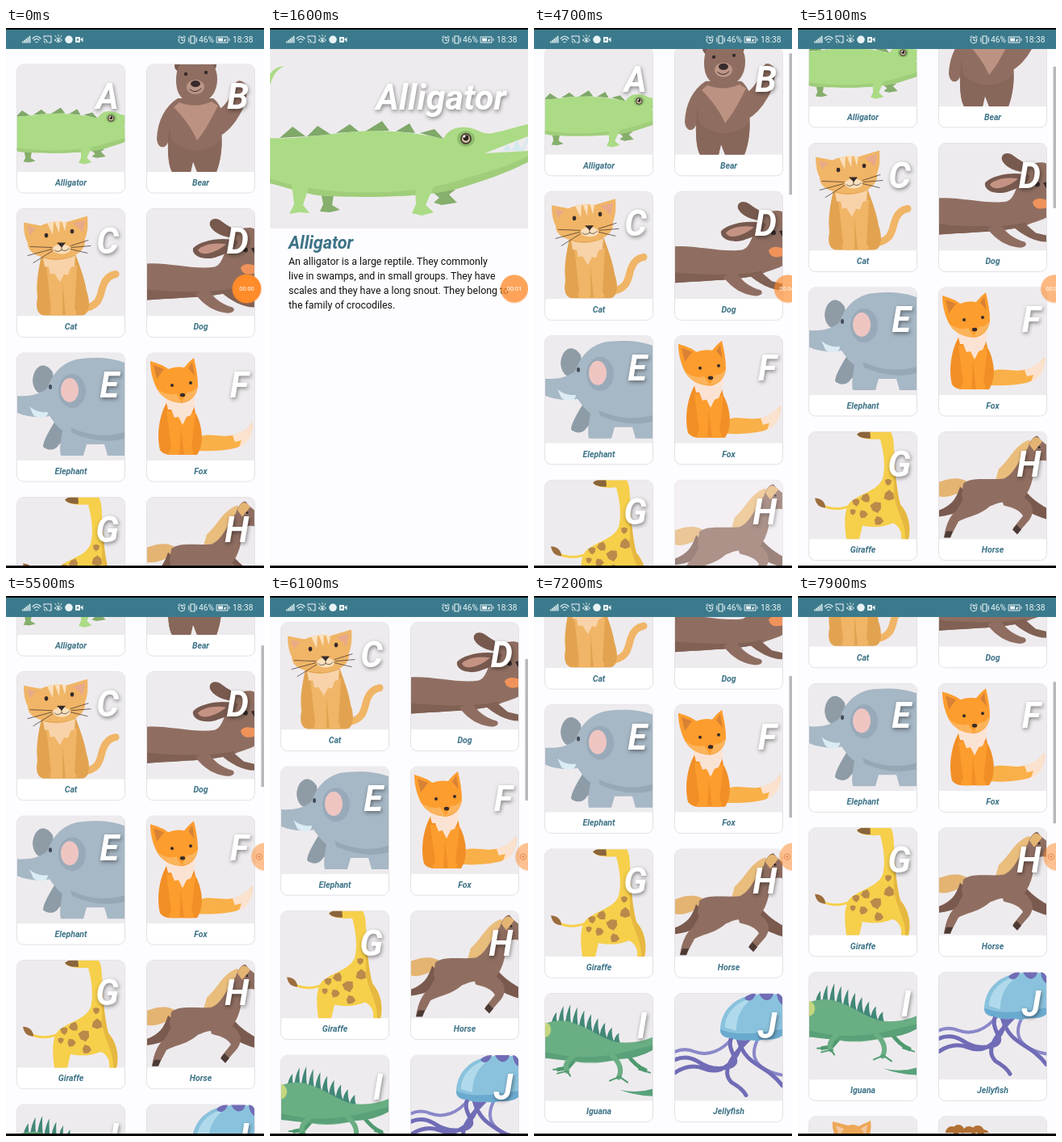
These frames come from a looping animation (320 by 668 pixels, 8000 ms). An HTML page with a canvas:

```html
<!DOCTYPE html>
<html lang="en">
<head>
<meta charset="utf-8">
<title>Animal alphabet</title>
<style>
html, body { margin: 0; width: 100%; height: 100%; overflow: hidden; background: #fdfcff; }
canvas { display: block; width: 320px; height: 668px; }
</style>
</head>
<body>
<canvas id="stage" width="320" height="668"></canvas>
<script>
const ctx = document.getElementById('stage').getContext('2d');
const LOOP = 8000, TEAL = '#3c7287', PANEL = '#eeebee', PAGE = '#fdfcff', DARK = '#372b2b';

// Path helpers
const oval = (x, y, rx, ry = rx) => `M${x - rx} ${y}a${rx} ${ry} 0 1 0 ${2 * rx} 0a${rx} ${ry} 0 1 0 ${-2 * rx} 0Z`;
const patch = (x, y, r) => 'M' + [0, 1, 2, 3, 4, 5].map(i => {
  const a = i * Math.PI / 3 + x, k = r * (i % 2 ? 0.85 : 1.05);
  return `${(x + k * Math.cos(a)).toFixed(1)} ${(y + k * Math.sin(a)).toFixed(1)}`;
}).join('L') + 'Z';

// Each layer is [colour, path, stroke width]; without a width it is filled.
const BROWN = '#8f6e61', GREY = '#a6b7c5', ORANGE = '#fc9d2e', YELLOW = '#f6cf4b', GREEN = '#6aae83', VIOLET = '#706cb6', CAT = '#f0b566';

// Drawn for the 320 x 222 banner
const alligator = [
  ['#7fa869', 'M12 110L28 96 44 108ZM46 108L59 95 76 106ZM82 104L99 93 110 102ZM118 102L139 89 148 101ZM156 102L173 92 180 104ZM186 104L204 99 216 112Z'],
  ['#86ae6c', 'M62 172L66 192 62 201 74 202 87 199 77 193 80 174ZM196 172L210 184 203 190 213 193 232 190 222 180 230 174Z'],
  ['#abdb85', 'M18 21Q5 26 0 45V31Q7 21 18 21Z'],
  ['#abdb85', 'M0 110C30 112 60 106 90 104C130 98 180 103 215 111C221 100 231 96 243 97C257 97 262 107 276 104C292 101 306 96 320 93V108L266 129 320 126V139C292 153 262 162 235 172C190 185 100 184 60 181C40 178 20 171 0 166Z'],
  ['#9fcd7a', 'M0 160C60 182 170 184 236 162C270 152 300 144 320 132V140C290 155 262 164 235 172C190 185 100 184 60 181C40 178 20 171 0 166Z'],
  ['#abdb85', 'M26 160L30 192 24 204 36 202 49 203 41 193 50 165ZM180 165L181 192 176 203 188 206 203 202 193 193 204 168Z'],
  ['#d5e8ef', 'M282 122L288 128 294 117 300 126 306 112 312 124 320 108V114L314 126H286Z'],
  ['#8ebd6d', oval(243, 111, 11, 10)],
  ['#4b4038', oval(243, 111, 7)], ['#d9c9a5', oval(243, 111, 5)], ['#292424', oval(243, 110, 3.4)],
  ['#fff', oval(241, 108, 1.5)]
];

// The rest are drawn for a 133 x 133 tile
const bear = [
  ['#7a5c51', oval(41, 2, 7) + oval(79, 1, 7)],
  [BROWN, 'M82 60Q100 52 107 30Q111 14 122 24Q127 42 115 62Q104 82 88 90Z'],
  [BROWN, 'M38 42C22 52 13 70 12 92C13 105 23 105 26 96C26 110 26 125 31 133H54L57 120 62 133H86C92 118 94 98 92 80C98 66 92 50 82 42Z'],
  ['#87675a', 'M28 74C24 98 26 124 31 133H54L57 120 62 133H86C91 120 93 104 92 92C80 110 44 112 30 92Z'],
  [BROWN, 'M36 20C36 0 44-8 61-8C78-8 87 2 87 18C87 36 76 48 61 48C45 48 36 38 36 20Z'],
  ['#bc9282', 'M33 53L40 47Q60 55 80 46L88 51C82 62 74 80 62 94C56 80 46 66 33 53Z'],
  ['#bc9686', oval(60, 28, 11, 9)],
  [DARK, oval(60, 24, 6, 4) + oval(48, 12, 2.2) + oval(73, 10, 2.2)],
  [DARK, 'M53 31Q60 37 67 30', 1]
];
const cat = [
  [CAT, 'M78 124C106 122 102 104 107 94C110 86 116 82 122 81', 9],
  ['#e2a350', 'M30 58C26 76 23 92 25 110C22 124 26 132 34 132H80C90 132 91 116 86 102C84 88 78 72 72 56Z'],
  [CAT, 'M36 70L42 124Q38 132 46 132H56V92L60 132H70Q76 130 71 124L74 70Z'],
  [CAT, 'M8 17C8 30 10 38 14 44L34 22ZM60 17L87 9C88 22 87 32 83 40Z'],
  ['#e8a98a', 'M12 22L17 36 27 25ZM69 18L84 14 81 30Z'],
  [CAT, 'M13 44C14 28 27 18 48 16C68 15 82 24 84 39C85 53 70 61 52 62C31 62 14 57 13 44Z'],
  ['#fae0bd', 'M37 18L44 32 45 16ZM46 15L52 30 53 15ZM55 15L59 28 61 17Z' + oval(55, 50, 11, 6)],
  ['#f8d3a9', 'M32 61L34 72 39 72 41 81 46 80 53 91 58 81 63 82 66 73 71 71 72 58Q52 67 32 61Z'],
  [DARK, oval(36, 33, 2.3, 2.8) + oval(68, 28, 2.3, 2.8) + 'M49 42H60L55 48Z'],
  [DARK, 'M55 47V51Q49 55 46 51M55 51Q61 54 64 49M43 48L16 47M43 50L13 58M44 52L20 67M66 46L88 39M67 48L91 46M66 50L87 55', .7]
];
const dog = [
  ['#77594e', 'M110 36C96 36 82 30 78 21C76 12 86 10 93 16C101 23 110 24 114 32Z'],
  ['#806154', 'M100 94L120 111 133 114V122C118 122 104 114 90 102Z'],
  [BROWN, 'M0 68C24 66 60 76 84 72C95 68 96 50 104 36C110 26 124 21 133 25V92C124 97 114 98 108 102C80 110 40 110 0 113Z'],
  ['#806154', 'M0 100C40 104 82 104 108 98V102C80 110 40 110 0 113Z'],
  [BROWN, 'M74 98C84 112 92 118 106 122C111 126 105 130 98 129C84 127 72 121 60 106Z'],
  ['#77594e', 'M113 40C94 34 66 39 57 49C55 60 74 65 88 59C100 55 111 50 113 40Z'],
  ['#c59384', 'M98 44C84 41 68 45 63 51C66 59 82 57 98 44Z'],
  [DARK, oval(122, 51, 3, 3) + 'M129 49L133 48V56Z'],
  ['#f0935b', 'M116 73C121 66 128 69 133 70V80C126 82 118 82 116 73Z']
];
const elephant = [
  ['#8f9ca6', 'M44 24C34 8 20 16 19 34C20 46 26 52 34 50L46 40Z'],
  ['#8d9ca7', 'M48 82C40 96 32 108 32 116C39 122 48 120 51 114L70 96Z'],
  [GREY, 'M133 12C118 6 98 5 80 7C58 9 44 24 38 42C30 52 12 54 0 53V74C14 80 30 80 40 78C46 86 50 92 56 96C54 108 52 118 54 127H82L86 113H108L112 127H133Z'],
  ['#96a8b6', 'M66 92Q100 108 133 98V106Q104 114 68 99Z'],
  ['#98aab9', oval(68, 47, 17, 21)], ['#efc5c2', oval(65, 46, 11, 15)],
  ['#454e57', oval(41, 42, 2, 3)],
  ['#dcecf4', 'M15 66C22 72 30 74 38 73C38 82 26 82 20 77Z']
];
const fox = [
  ['#f9b048', 'M58 108C74 94 92 108 112 100C120 97 126 92 130 86C133 100 124 114 108 118C90 122 70 122 56 120Z'],
  ['#fbe2cf', 'M106 102C120 97 126 92 130 86C133 100 124 114 114 117L117 108 109 110Z'],
  ['#f18f26', 'M26 58C14 78 12 102 16 120Q20 126 30 126H62C72 112 68 88 60 74L56 56Z'],
  [ORANGE, 'M24 72L30 118Q24 126 30 126H40L42 92 46 126H56Q60 124 55 118L60 74Z'],
  ['#fbe3d4', 'M22 54L26 70 30 70 34 80 39 79 44 89 49 79 54 77 58 68 60 54Z'],
  [ORANGE, 'M4 10C14 13 22 16 26 20Q36 16 46 18C50 13 54 9 58 6C61 18 63 30 63 41C62 53 53 61 43 62C28 61 17 54 12 44C6 32 4 20 4 10Z'],
  ['#d98134', 'M8 15L21 20 12 32ZM56 11L51 19 59 28Z'],
  ['#fbb45b', 'M13 45Q26 54 36 50L43 61Q22 61 13 45ZM63 41Q56 50 50 48L43 61Q60 58 63 41Z'],
  [DARK, oval(31, 40, 2) + oval(54, 37, 2) + oval(44, 52, 3.2, 2.3)]
];
const giraffe = [
  [YELLOW, 'M52 91C38 97 24 96 15 90', 3],
  ['#9b6d3e', 'M7 82C15 82 20 87 20 94C12 94 8 89 7 82Z'],
  [YELLOW, 'M59 3C66-2 80-6 92-6C104-4 105 10 105 24C105 50 108 74 113 90C122 100 127 116 123 133H114C115 124 112 117 104 113C92 118 78 119 66 116L62 133H46C44 118 42 98 50 88C62 76 84 74 91 58C95 42 92 24 88 9C76 10 62 9 59 3Z'],
  ['#e6b840', 'M105 20C106 50 109 74 113 90C122 100 127 116 123 133H119C120 112 107 98 105 76Z'],
  ['#b98a4a', [[58, 87, 5], [70, 82, 6], [83, 93, 7.5], [99, 79, 7], [67, 102, 5.5], [86, 110, 6], [98, 62, 4.5], [54, 99, 4]].map(p => patch(...p)).join('')],
  ['#8a643b', 'M59 3Q66-2 75-3L76 8Q63 9 59 3Z']
];
const horse = [
  ['#e4b473', 'M38 64C26 54 12 58 0 62V80C14 83 26 74 38 68Z'],
  ['#e9bd7c', 'M112 10C94 16 88 34 74 46L70 60 104 54 118 22Z'],
  ['#7a5a4e', 'M26 68L46 86C34 96 18 103 0 105V97C14 92 21 84 26 68ZM92 76L106 72C116 84 126 90 133 94V108C120 104 106 98 92 88Z'],
  [BROWN, 'M30 64C40 55 60 60 80 58C94 52 98 36 110 20C113 10 118 5 122 5L126 10 133 16V36C126 34 120 36 118 46C116 64 110 80 98 89C84 86 76 86 66 91C48 97 30 94 28 78Z'],
  [BROWN, 'M34 76L66 89C52 104 36 104 24 111L14 130 6 130C9 114 13 104 22 97ZM78 84L104 80C115 88 120 97 112 109L98 125 92 119 104 104C100 97 92 94 80 91Z'],
  ['#4c3a35', 'M9 123H17L14 131H6ZM96 115L102 121 97 127 91 121Z'],
  [DARK, oval(124, 19, 1.5)],
  ['#e4b473', 'M112 16Q118 0 128 12L118 24Z']
];
const spines = [...Array(10).keys()].map(i => {
  const x = 7 + i * 8.6, base = 36 + i * i * .26, height = i < 2 ? 13 + 8 * i : 28 - 2.2 * i;
  return `M${x} ${base + 6}Q${x + 1} ${base - height / 2} ${x + 7} ${base - height}Q${x + 6} ${base} ${x + 10} ${base + 8}Z`;
}).join('');
const iguana = [
  ['#428878', spines],
  ['#4f9a70', 'M42 76L28 92 16 94M102 76Q112 90 124 95', 5],
  [GREEN, 'M0 37C12 33 24 32 36 37C54 42 70 56 88 60Q112 63 133 54V70Q116 80 92 81C70 87 50 87 36 84C22 82 10 77 0 80Z'],
  ['#5aa078', 'M0 72Q44 84 92 74L133 64V70Q116 80 92 81C60 88 20 82 0 80Z'],
  [GREEN, 'M34 78Q22 88 27 96M82 76Q98 90 91 104', 6],
  ['#4f9a70', 'M15 99L27 96 31 102M80 108L92 103 102 110M10 94L19 94M116 94L130 98', 2],
  ['#c4d67f', oval(0, 45, 7, 9)],
  ['#58a27b', 'M92 119Q114 124 133 118V127Q110 126 92 119Z']
];
const jellyfish = [
  ['#8a88c9', 'M72 54C58 72 40 78 24 72Q12 67 0 72M104 54C88 82 106 96 133 101', 4],
  [VIOLET, 'M84 56C78 84 58 102 36 93Q18 86 0 98M92 56C66 82 58 98 70 110Q84 118 88 126M78 56C88 92 112 86 133 114M70 54C62 72 84 82 70 90Q48 98 28 84Q14 76 0 82', 5],
  ['#8ac2dd', 'M56 46C56 20 76 2 104 1H133V52C122 60 112 54 102 59C90 56 80 60 70 55C62 55 56 52 56 46Z'],
  ['#b0daeb', 'M62 42C62 22 80 8 96 6C80 18 76 32 76 46Z'],
  [VIOLET, 'M86 6C89 1 96 0 100 0C98 8 91 12 86 6ZM104 0H122C120 10 110 12 104 0ZM126 0H133V14Q127 10 126 0Z'],
  ['#6baacf', 'M56 44C76 54 108 48 133 44V52C122 60 112 54 102 59C90 56 80 60 70 55C62 55 56 52 56 44Z']
];
const kangaroo = [
  ['#eca757', 'M29 6L48 11Q56 9 61 12L76 5C78 18 74 26 70 30H36C30 22 28 14 29 6Z'],
  ['#f2c7a0', 'M33 11L43 15 37 24ZM72 10L64 15 70 23Z']
];
const lion = [['#b27034', oval(16, 20, 8) + oval(24, 17, 7) + oval(37, 20, 8) + oval(48, 19, 8) + oval(55, 24, 8) + 'M8 20H62V34H8Z']];

const ANIMALS = [['Alligator', alligator], ['Bear', bear], ['Cat', cat], ['Dog', dog], ['Elephant', elephant], ['Fox', fox],
  ['Giraffe', giraffe], ['Horse', horse], ['Iguana', iguana], ['Jellyfish', jellyfish], ['Kangaroo', kangaroo], ['Lion', lion]]
  .map(([name, layers]) => ({ name, layers: layers.map(([color, d, width]) => ({ color, path: new Path2D(d), width })) }));

// Timing: [ms, value] keys joined by straight lines
function track(keys, t) {
  const i = keys.findIndex(k => k[0] > t);
  if (i === 0) return keys[0][1];
  if (i < 0) return keys[keys.length - 1][1];
  const [a, b] = [keys[i - 1], keys[i]];
  return a[1] + (b[1] - a[1]) * (t - a[0]) / (b[0] - a[0]);
}
// Opacity of the cards dimmed by a touch
const PRESSES = {
  Alligator: [[1150, 1], [1300, .72], [1600, .72], [1700, 1]],
  Horse: [[4250, 1], [4400, .72], [4680, .72], [4900, 1]]
};
// Scroll keys: [ms, offset, speed]
const SCROLL = [[4600, 0, .22], [4700, 21, .17], [5500, 129.7, .115], [6700, 237.8, .068], [7900, 293.6, .025], [8000, 296, .02]];
function scrollAt(t) {
  const i = SCROLL.findIndex(k => k[0] > t);
  if (i <= 0) return 0;
  const [t0, p0, v0] = SCROLL[i - 1], [t1, p1, v1] = SCROLL[i];
  const d = t1 - t0, u = (t - t0) / d, w = 1 - u;
  return w * w * (1 + 2 * u) * p0 + u * w * w * d * v0 + u * u * (3 - 2 * u) * p1 - u * u * w * d * v1;
}

// Drawing helpers
function text(str, x, y, font, color, align = 'left') {
  ctx.font = font + ' Roboto, sans-serif';
  ctx.fillStyle = color;
  ctx.textAlign = align;
  ctx.fillText(str, x, y);
}
function shadowText(str, x, y) {
  ctx.save();
  ctx.shadowColor = 'rgba(0,0,0,.45)';
  ctx.shadowBlur = 5;
  ctx.shadowOffsetX = 1;
  ctx.shadowOffsetY = 2;
  text(str, x, y, 'italic 700 43.5px', '#fff', 'right');
  ctx.restore();
}
function rect(color, x, y, w, h) {
  ctx.fillStyle = color;
  ctx.fillRect(x, y, w, h);
}
function shape(color, d, width) {
  paint({ color, path: new Path2D(d), width });
}
function paint({ color, path, width }) {
  ctx.fillStyle = ctx.strokeStyle = color;
  if (!width) return ctx.fill(path);
  ctx.lineWidth = width;
  ctx.lineCap = ctx.lineJoin = 'round';
  ctx.stroke(path);
}

function drawCard({ name, layers }, x, y, opacity) {
  ctx.save();
  ctx.beginPath();
  ctx.roundRect(x, y, 134, 159, 8);
  ctx.fillStyle = '#fff';
  ctx.fill();
  ctx.strokeStyle = '#e3e0e5';
  ctx.lineWidth = 1;
  ctx.stroke();
  ctx.clip();
  ctx.beginPath();
  ctx.rect(x, y, 134, 133);
  ctx.clip();
  rect(PANEL, x, y, 134, 133);
  ctx.save();
  ctx.translate(x + .5, y);
  if (layers === ANIMALS[0].layers) {
    ctx.translate(66.5 - 96, 0);
    ctx.scale(.6, .6);
  }
  layers.forEach(paint);
  ctx.restore();
  shadowText(name[0], x + 126.5, y + 55);
  ctx.restore();
  text(name, x + 67, y + 149.8, 'italic 700 10.5px', TEAL, 'center');
  // A veil in the page colour stands for the card's own opacity
  ctx.globalAlpha = 1 - opacity;
  rect(PAGE, x - 1, y - 1, 136, 161);
  ctx.globalAlpha = 1;
}

function drawList(t) {
  const scroll = scrollAt(t);
  rect(PAGE, 0, 26, 320, 642);
  ANIMALS.forEach((animal, i) => {
    const y = 45 + 178.5 * (i >> 1) - scroll;
    const press = PRESSES[animal.name];
    if (y > -160 && y < 668) drawCard(animal, i % 2 ? 174.5 : 13.5, y, press ? track(press, t) : 1);
  });
  if (scroll > 0) rect('#b9b7ba', 316.5, 25.5 + scroll * .275, 3.5, 175);
}

function drawDetail(alpha) {
  ctx.save();
  ctx.globalAlpha = alpha;
  rect(PAGE, 0, 26, 320, 642);
  rect(PANEL, 0, 26, 320, 222);
  ctx.save();
  ctx.translate(0, 26);
  ANIMALS[0].layers.forEach(paint);
  ctx.restore();
  shadowText('Alligator', 293, 101);
  text('Alligator', 23, 273, 'italic 700 21.6px', TEAL);
  ['An alligator is a large reptile. They commonly', 'live in swamps, and in small groups. They have',
    'scales and they have a long snout. They belong to', 'the family of crocodiles.']
    .forEach((line, i) => text(line, 23, 293.3 + 17.75 * i, '400 12.4px', '#111'));
  ctx.restore();
}

function drawBubble(t) {
  const x = track([[1500, 298.5], [1600, 303], [2200, 315], [4900, 315], [5300, 321.5]], t);
  const tucked = t > 5200;
  ctx.save();
  ctx.globalAlpha = track([[1450, 1], [1600, .72], [2200, .6], [4900, .6], [5300, .46]], t);
  shape('rgba(235,120,40,.22)', oval(x, 323, track([[1450, 19], [1600, 18]], t)));
  shape('#ff8b29', oval(x, 322.5, track([[1450, 17.8], [1600, 17]], t)));
  ctx.restore();
  if (tucked) {
    shape('#e99462', oval(314, 322.5, 3.6), 1.2);
    shape('#e99462', oval(314, 322.5, 1.6));
  } else {
    const seconds = [1000, 2200, 3200, 4100, 5000].filter(s => t >= s).length;
    text('00:0' + seconds, x - (x > 310 ? 1.5 : 0), 325, '400 7.5px', '#fff', 'center');
  }
}

function drawStatusBar() {
  rect('#3b7a8c', 0, 0, 320, 26);
  rect('#000', 0, 0, 320, 2);
  rect('#000', 0, 665, 320, 3);
  const ink = '#e9f3f5';
  for (let i = 0; i < 5; i++) rect(ink, 20 + i * 2.2, 16.5 - i * 1.7, 1.5, 2 + i * 1.7);
  shape(ink, 'M33 13Q38 7.5 43 13M35 15Q38 11.5 41 15M37 17.5H39', 1.2);
  shape(ink, 'M47 12V10H56V18H53M47 14Q51 14 51 18M47 16.5Q48.5 16.5 48.5 18', 1.1);
  shape(ink, 'M60.5 15Q65 9.5 69.5 15Q65 20 60.5 15ZM62 11L61 9.5M65 10V8.5M68 11L69 9.5', 1);
  shape(ink, oval(65, 15, 1.6));
  shape(ink, oval(78, 14.3, 4.8));
  shape(ink, 'M86 11H92V18H86ZM92 14L95.5 11.5V17.5Z');
  shape('#3b7a8c', oval(89, 14.5, 1.2));
  shape(ink, oval(218, 15, 3.8) + 'M218 12.5V15.3H220M213.5 11.5L215.5 9.8M222.5 11.5L220.5 9.8', 1);
  shape(ink, 'M229 10H234V19H229ZM226.8 12V17M236.2 12V17', 1.1);
  text('46%', 239, 18.2, '400 10.3px', ink);
  shape(ink, 'M261.5 11H275V18H261.5ZM277 13.5V15.5', 1);
  rect(ink, 263, 12.5, 6, 4);
  shape(ink, 'M270 15L273 12.5 272 14.5H274L271 17Z');
  text('18:38', 281, 18.2, '400 10.3px', ink);
}

function render(now) {
  const t = now % LOOP;
  const detail = track([[1450, 0], [1590, 1], [3950, 1], [4100, 0]], t);
  ctx.clearRect(0, 0, 320, 668);
  if (detail < 1) drawList(t);
  if (detail > 0) drawDetail(detail);
  drawBubble(t);
  drawStatusBar();
}

const start = performance.now();
function tick() {
  render(performance.now() - start);
  requestAnimationFrame(tick);
}
tick();
</script>
</body>
</html>
```
